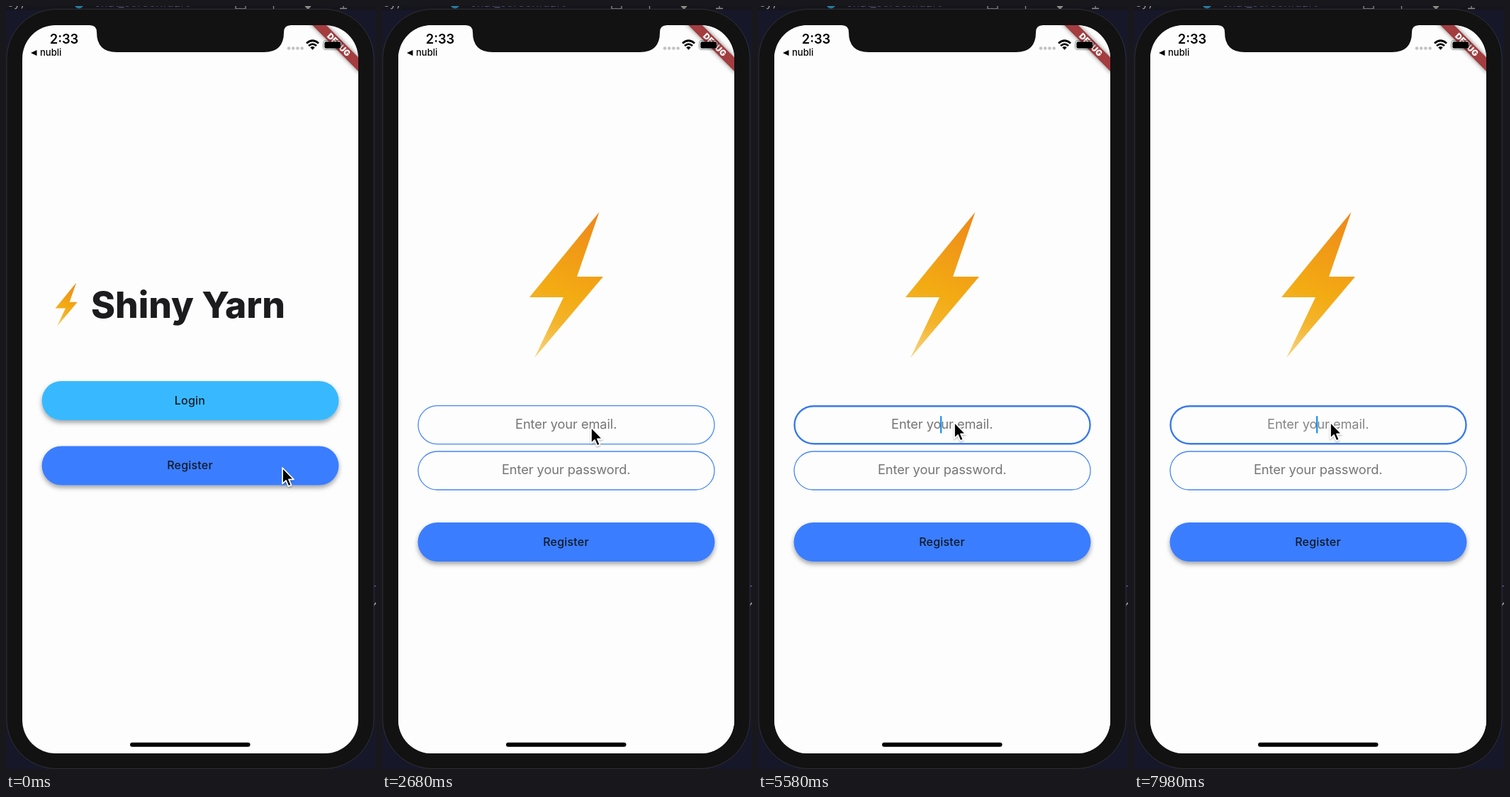
These frames come from a looping animation (522 px wide and 1074 px high, 8000 ms). An HTML page:

```html
<!DOCTYPE html>
<html lang="en">
<head>
<meta charset="utf-8">
<title>Chat sign-up</title>
<style>
  html, body { margin: 0; width: 100%; height: 100%; overflow: hidden; background: #17172a; }
  svg { display: block; width: 522px; height: 1074px; font-family: Inter, Roboto, sans-serif; }
  .mid { text-anchor: middle; }
  .label { font-size: 16px; font-weight: 500; letter-spacing: .2px; fill: #111a26; text-anchor: middle; }
  .hint { font-size: 18.3px; letter-spacing: -.1px; fill: #757575; text-anchor: middle; }
  .field { fill: none; stroke: #4688f2; stroke-width: 1.3px; }
</style>
</head>
<body>
<svg viewBox="0 0 522 1074" xmlns="http://www.w3.org/2000/svg">
  <defs>
    <clipPath id="screen"><rect x="23" y="27" width="474" height="1025" rx="47"/></clipPath>
    <linearGradient id="gold" gradientUnits="userSpaceOnUse" x1="306" y1="290" x2="215" y2="495">
      <stop offset="0" stop-color="#ee881b"/>
      <stop offset=".55" stop-color="#f3ab13"/>
      <stop offset=".75" stop-color="#f4b42c"/>
      <stop offset="1" stop-color="#f8d686"/>
    </linearGradient>
    <filter id="lift" x="-10%" y="-30%" width="120%" height="180%">
      <feDropShadow dx="0" dy="3.5" stdDeviation="3" flood-color="#000" flood-opacity=".36"/>
    </filter>
    <filter id="soft" x="-20%" y="-60%" width="140%" height="220%">
      <feGaussianBlur stdDeviation="3"/>
    </filter>
    <filter id="drop" x="-40%" y="-20%" width="200%" height="160%">
      <feDropShadow dx="0" dy="1.5" stdDeviation="1.2" flood-color="#000" flood-opacity=".3"/>
    </filter>
  </defs>

  <!-- desktop peeking out behind the phone -->
  <rect width="522" height="1074" fill="#17172a"/>
  <rect width="522" height="6" fill="#15151c"/>
  <g font-size="17" fill="#4d5270">
    <text x="2" y="1" fill="#9295a0">sy)</text>
    <text x="124" y="1">chat_screen.dart</text>
  </g>
  <circle cx="103" cy="-3" r="6.5" fill="#27799f"/>
  <g fill="none" stroke="#8a8a90" stroke-width="1.3">
    <path d="M324 -4V4H338V-4M377.500 -2V4M471 3.500H481M476 0V4"/>
    <path d="M422 0L426 4L430 0" fill="#8a8a70"/>
    <path d="M517 816.500H522" stroke="#6c5697"/>
    <path d="M517 846L522 840" stroke="#b9b9bd"/>
  </g>

  <rect x="1" y="4.500" width="518" height="1069" rx="70" fill="#121212" stroke="#303034"/>

  <g clip-path="url(#screen)">
    <rect x="23" y="27" width="474" height="1025" fill="#fdfdfd"/>
    <g id="welcome">
      <text x="120" y="439" font-size="51.500" font-weight="800" fill="#1c1c1e">Shiny Yarn</text>
      <rect x="50.500" y="528" width="419" height="55" rx="27.500" fill="#38b9ff" filter="url(#lift)"/>
      <text class="label" x="259.500" y="561">Login</text>
      <rect x="50.500" y="619.500" width="419" height="55" rx="27.500" fill="#3b7dff" filter="url(#lift)"/>
      <text class="label" x="259.500" y="652">Register</text>
    </g>
    <g id="signup">
      <rect x="23" y="27" width="474" height="1025" fill="#fdfdfd"/>
      <rect id="email" class="field"/>
      <text id="emailHint" class="hint" x="259.700" y="595">Enter your email.</text>
      <text id="typed" class="hint" x="258" y="595" style="fill:#1c1c1c">e</text>
      <rect id="caret" y="577" width="2.300" height="24.500" rx="1" fill="#2094f0"/>
      <rect class="field" x="51" y="627" width="418" height="54" rx="27"/>
      <text class="hint" x="259.700" y="659">Enter your password.</text>
      <rect x="50.500" y="727" width="419" height="55" rx="27.500" fill="#3b7dff" filter="url(#lift)"/>
      <text class="label" x="259.500" y="760">Register</text>
    </g>
    <path id="bolt" fill="url(#gold)" d="M306.500 290L208 410H256L215 495.500L312 381H275Z"/>

    <g transform="translate(497 27) rotate(45)">
      <rect x="-60" y="32" width="120" height="13.800" fill="#000" opacity=".5" filter="url(#soft)"/>
      <rect x="-60" y="32" width="120" height="13.800" fill="#a33d3f"/>
      <text class="mid" y="43" font-size="11.700" font-weight="900" fill="#fff">DEBUG</text>
    </g>
  </g>

  <path d="M118 26V27Q128 27 128 37Q128 65 156 65H364Q392 65 392 37Q392 27 402 27V26Z" fill="#121212"/>

  <!-- status bar -->
  <text class="mid" x="82" y="53" font-size="18.300" font-weight="600">2:33</text>
  <path d="M35 66L43.500 62V70Z"/>
  <text x="48" y="70" font-size="13" font-weight="500">nubli</text>
  <path d="M399 59.500H419" stroke="#c3c3c6" stroke-width="4.600" stroke-linecap="round" stroke-dasharray="0 6.200"/>
  <g fill="none" stroke="#000" stroke-width="2.700">
    <path d="M424 52.500Q432.500 45 441 52.500M427 56Q432.500 51.300 438 56"/>
    <path d="M429.300 58.300Q432.500 55.800 435.700 58.300L432.500 61.800Z" fill="#000" stroke="none"/>
  </g>
  <rect x="447.500" y="48.500" width="26.500" height="13" rx="3.800" fill="none" stroke="#000" stroke-opacity=".4" stroke-width="1.100"/>
  <rect x="449.300" y="50.200" width="23" height="9.600" rx="2.300"/>
  <path d="M475.500 53Q477.500 55 475.500 57Z" opacity=".4"/>

  <rect x="175" y="1036.700" width="169.500" height="6" rx="3"/>
  <path id="pointer" d="M0 0V22.500L5 17.800L8.500 26L12.500 24.300L9 16.300H16Z"
        stroke="#fff" stroke-width="1.700" stroke-linejoin="round" filter="url(#drop)"/>
</svg>
<script>
  const LOOP = 8000;
  const PUSH = 1980, FOCUS = 4380, TYPE = 6350, ERASE = 7840;
  const el = id => document.getElementById(id);
  const [welcome, signup, bolt, email, emailHint, typed, caret, pointer] =
    ['welcome', 'signup', 'bolt', 'email', 'emailHint', 'typed', 'caret', 'pointer'].map(el);

  const set = (node, attrs) => {
    for (const name in attrs) node.setAttribute(name, attrs[name]);
  };
  const mix = (a, b, k) => a + (b - a) * k;
  const span = (t, from, length) => Math.min(1, Math.max(0, (t - from) / length));
  const smooth = k => k * k * (3 - 2 * k);
  const easeOut = k => 1 - (1 - k) ** 3;

  // time, x, y
  const pointerPath = [
    [300, 390, 650], [1400, 352, 650], [2240, 352, 650],
    [2620, 295, 593], [2900, 295, 593], [3500, 277, 586]
  ];

  function pointerAt(t) {
    let [, x, y] = pointerPath[0];
    for (let i = 1; i < pointerPath.length; i++) {
      const [from] = pointerPath[i - 1], [to, nextX, nextY] = pointerPath[i];
      const k = smooth(span(t, from, to - from));
      x = mix(x, nextX, k);
      y = mix(y, nextY, k);
    }
    return [x, y];
  }

  // Half a second on, half a second off, with soft edges; each edit restarts it.
  function blink(t) {
    if (t < FOCUS) return 0;
    const start = t >= ERASE ? ERASE : t >= TYPE ? TYPE : FOCUS;
    const age = t - start, phase = age % 1000;
    if (phase >= 500) return 1 - easeOut(span(phase, 500, 250));
    return age < 1000 ? 1 : easeOut(span(phase, 0, 250));
  }

  function draw(t) {
    const push = easeOut(span(t, PUSH, 420));
    const fly = smooth(span(t, PUSH, 420));
    set(welcome, { transform: `translate(${-158 * push} 0)` });
    set(signup, { transform: `translate(${474 * (1 - push)} 0)` });
    set(bolt, {
      transform: `translate(${mix(7.2, 0, fly)} ${mix(302.5, 0, fly)}) scale(${mix(.3, 1, fly)})`
    });

    const focus = span(t, FOCUS, 170);
    const inset = mix(0, .5, focus);
    set(email, {
      x: 51 + inset, y: 562.7 + inset, width: 418 - 2 * inset, height: 54 - 2 * inset, rx: 27,
      style: `stroke-width:${mix(1.3, 2.4, focus)}px;stroke:${focus ? '#3b7bea' : '#4688f2'}`
    });

    const hasText = t >= TYPE && t < ERASE;
    const hintFade = t < ERASE ? 1 - span(t, TYPE, 190) : span(t, ERASE, 160);
    set(emailHint, { opacity: hintFade });
    set(typed, { opacity: hasText ? 1 : 0 });
    set(caret, { x: hasText ? 262 : 257, opacity: blink(t) });

    const [x, y] = pointerAt(t);
    set(pointer, { transform: `translate(${x} ${y})` });
  }

  const begin = performance.now();
  function frame() {
    draw((performance.now() - begin) % LOOP);
    requestAnimationFrame(frame);
  }
  frame();
</script>
</body>
</html>
```
